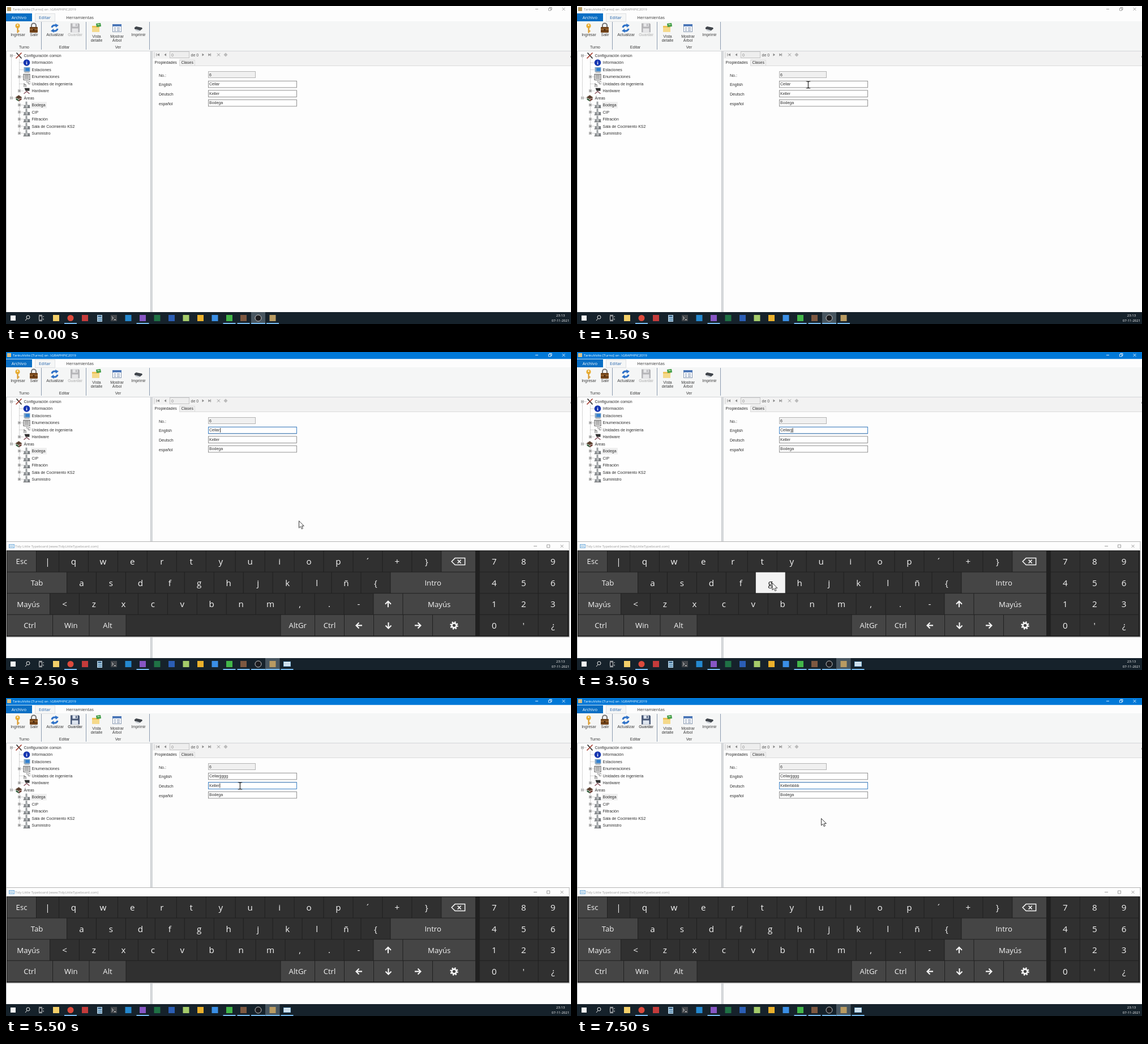
An HTML page for the animation above (8000 ms loop, 998 by 561 pixels).

```html
<!DOCTYPE html>
<html lang="es">
<head>
<meta charset="utf-8">
<title>Áreas</title>
<style>
html, body { margin: 0; width: 100%; height: 100%; overflow: hidden; background: #fdfdfd; }
svg { display: block; width: 998px; height: 561px; font: 7px "Liberation Sans", Arial, sans-serif; }
text { fill: #303030; white-space: pre; }
.ui { font-family: "Open Sans", "Noto Sans", sans-serif; }
.mid { text-anchor: middle; }
.at { animation: 8s step-end infinite; }
@keyframes from2000 { 0% { visibility: hidden } 25%, 100% { visibility: visible } }
@keyframes from2500 { 0% { visibility: hidden } 31.25%, 100% { visibility: visible } }
@keyframes from3000 { 0% { visibility: hidden } 37.5%, 100% { visibility: visible } }
@keyframes from3500 { 0% { visibility: hidden } 43.75%, 100% { visibility: visible } }
@keyframes from4000 { 0% { visibility: hidden } 50%, 100% { visibility: visible } }
@keyframes from4500 { 0% { visibility: hidden } 56.25%, 100% { visibility: visible } }
@keyframes from5500 { 0% { visibility: hidden } 68.75%, 100% { visibility: visible } }
@keyframes from6500 { 0% { visibility: hidden } 81.25%, 100% { visibility: visible } }
@keyframes from7000 { 0% { visibility: hidden } 87.5%, 100% { visibility: visible } }
@keyframes focusTop { 0%, 68.75%, 100% { visibility: hidden } 25% { visibility: visible } }
@keyframes pressJ { 0%, 43.75%, 100% { visibility: hidden } 37.5% { visibility: visible } }
@keyframes pressG { 0%, 62.5%, 100% { visibility: hidden } 43.75% { visibility: visible } }
@keyframes pressB { 0%, 93.75%, 100% { visibility: hidden } 75% { visibility: visible } }
@keyframes caret {
  0% { visibility: hidden }
  25% { visibility: visible; transform: translate(378px, 134px) }
  37.5% { visibility: visible; transform: translate(379.2px, 134px) }
  43.75% { visibility: visible; transform: translate(380.7px, 134px) }
  50% { visibility: visible; transform: translate(384.6px, 134px) }
  56.25% { visibility: visible; transform: translate(392.4px, 134px) }
  68.75% { visibility: visible; transform: translate(377.3px, 150.5px) }
  81.25% { visibility: visible; transform: translate(385px, 150.5px) }
  87.5% { visibility: visible; transform: translate(392.8px, 150.5px) }
  93.75%, 100% { visibility: hidden }
}
@keyframes arrow {
  0% { visibility: hidden }
  31.25% { visibility: visible; transform: translate(517px, 297.5px) }
  37.5% { visibility: visible; transform: translate(447px, 407px) }
  43.75% { visibility: visible; transform: translate(344.5px, 407px) }
  62.5% { visibility: visible; transform: translate(378px, 270px) }
  68.75% { visibility: hidden }
  75% { visibility: visible; transform: translate(366px, 444px) }
  93.75%, 100% { visibility: visible; transform: translate(431px, 212px) }
}
@keyframes beam {
  0%, 31.25%, 75%, 100% { visibility: hidden }
  18.75% { visibility: visible; transform: translate(408.5px, 139px) }
  25% { visibility: visible; transform: translate(407px, 134.5px) }
  68.75% { visibility: visible; transform: translate(413.5px, 155px) }
}
</style>
</head>
<body>
<svg id="stage" viewBox="0 0 998 561"></svg>
<script>
const rect = (x, y, w, h, fill, more = '') =>
  `<rect x="${x}" y="${y}" width="${w}" height="${h}" fill="${fill}" ${more}/>`;
const box = (x, y, w, h, fill, line) =>
  rect(x + .5, y + .5, w - 1, h - 1, fill, `stroke="${line}"`);
const disc = (x, y, r, fill, more = '') => `<circle cx="${x}" cy="${y}" r="${r}" fill="${fill}" ${more}/>`;
const text = (x, y, s, more = '') => `<text x="${x}" y="${y}" ${more}>${s}</text>`;
const ui = (x, y, s, size, fill, cls = '') =>
  text(x, y, s, `class="ui ${cls}" style="font-size:${size}px;fill:${fill}"`);
const fillPath = (d, fill) => `<path d="${d}" fill="${fill}"/>`;
const linePath = (d, stroke, width = 1, more = '') =>
  `<path d="${d}" fill="none" stroke="${stroke}" stroke-width="${width}" ${more}/>`;
const move = (x, y, body) => `<g transform="translate(${x} ${y})">${body}</g>`;
const anim = (name, body) => `<g class="at" style="animation-name:${name}">${body}</g>`;
const typed = (ms, s) => `<tspan class="at" style="animation-name:from${ms}">${s}</tspan>`;

function titleBar(bg, ink, icon) {
  return rect(0, 0, 998, 12.5, bg) + rect(2, 2, 7, 7, icon) +
    ui(12, 8, 'TankuVolto [Turno] on .\\GRAPHPIC2019', 6.1, ink) +
    linePath('M935 5.5h5M958.5 4h4v4h-4zM960 4v-1.5h4v4h-1.5M982.5 3l5 5m0-5l-5 5', ink, .8);
}

const floppy = (main, label) => move(122, 38.5,
  fillPath('M-8-8H6.500L8-6.500V8H-8z', main) + rect(-4.5, -8, 9, 6, label) +
  rect(-5.5, 1, 11, 7, label) + rect(1, -7, 2, 4, main));

function ribbon() {
  const label = (x, y, s, fill = '#3c3c3c') => text(x, y, s, `class="mid" style="fill:${fill}"`);
  const icons =
    move(20.5, 39, disc(0, -4, 4, '#e9ae33') + disc(0, -5.3, 1.2, '#fff') +
      fillPath('M-1-1H1.200V8L0 9L-1 8z', '#d9982a') + rect(1, 4, 2, 2.4, '#d9982a')) +
    move(49, 39, linePath('M-4-1V-5a4 3.500 0 0 1 8 0V-1', '#777', 2) +
      rect(-7, -2, 14, 10, '#704218', 'rx="1"') + rect(-7, 1, 14, 2, '#9a6631') + disc(0, 3, 1.3, '#2a1708')) +
    move(86, 39, linePath('M-5-1a5 5 0 0 1 8-3M5 1a5 5 0 0 1-8 3', '#2f72c8', 3) +
      fillPath('M1-8l6 3l-5 4zM-1 8l-6-3l5-4z', '#2f72c8')) +
    floppy('#b5b5b8', '#e6e6e8') +
    move(160, 39, rect(-8, -4, 13, 10.5, '#edc35a') + rect(-8, -1, 13, 7.5, '#f5d98a') +
      fillPath('M-1-8L7-9L8-3L0-2z', '#3f9c45') + rect(1.5, -7, 4, 1.5, '#bfe3b4')) +
    move(196, 39, box(-8, -7, 16, 14, '#fafcff', '#8a9bb2') + rect(-8, -7, 16, 4, '#4d78b8') +
      linePath('M-5-.5h3M0-.5h5M-5 2h3M0 2h5M-5 4.500h3M0 4.500h5', '#7d8ea8')) +
    move(234, 39, fillPath('M-2-5L6-3.500L3 0L-5-2z', '#fff') + fillPath('M-7-1L-4-3L6-1L7 1L2 5L-7 1.500z', '#41464c') +
      fillPath('M-4 2L3 4L0 6L-6 4z', '#c9ced4'));
  return rect(0, 12.5, 998, 15, '#fdfdfd') + rect(0, 27, 998, 52.5, '#f5f6f6') +
    rect(0, 13, 46, 14, '#0a6fc4') + ui(22.8, 23, 'Archivo', 7.6, '#fff', 'mid') +
    box(51, 13, 36, 15, '#f5f6f6', '#dfe1e3') + ui(68.5, 23, 'Editar', 7.6, '#2464ac', 'mid') +
    ui(130.5, 23, 'Herramientas', 7.6, '#333', 'mid') +
    [62, 141, 253].map(x => rect(x, 28, 1, 49, '#8c9bb0')).join('') + rect(0, 79, 998, 1, '#d3d5d8') +
    icons + label(21, 53, 'Ingresar') + label(49.5, 53, 'Salir') + label(86.5, 53, 'Actualizar') +
    label(122, 53, 'Guardar', '#aaa') + label(160, 55.5, 'Vista') + label(160, 63, 'detalle') +
    label(196, 55.5, 'Mostrar') + label(196, 63, 'Árbol') + label(234, 53, 'Imprimir') +
    label(32, 75, 'Turno') + label(103, 75, 'Editar') + label(198, 75, 'Ver') +
    anim('from5500', floppy('#4a5a78', '#dfe6f0') + label(122, 53, 'Guardar'));
}

function tree() {
  const tanks = rect(-2, -6, 3, 6, '#9b9fa2') + rect(-5, 0, 4, 5, '#8d9194') + rect(-1, -1, 3, 6, '#b3b6b8') +
    rect(2, 0, 3.5, 5, '#777c80') + linePath('M-6 5H6', '#66696c');
  const icon = {
    tools: linePath('M-4-5L5 5', '#333', 1.8) + linePath('M5-5L-5 5', '#a33a2c', 1.6),
    info: disc(0, 0, 5.8, '#1535b0') + text(0, 3, 'i', 'class="mid" style="fill:#fff;font:bold 9px \'Liberation Serif\',serif"'),
    screen: rect(-5, -4.5, 11, 8, '#7fa3c4') + rect(-2, -3, 7, 5, '#2f7fd0') + rect(-4, 4, 9, 1, '#777'),
    list: box(-6, -5, 12, 11, '#fff', '#555') + linePath('M-4-2.500H4M-4 0H4M-4 2.500H4', '#444'),
    unit: text(-5.5, 6, 'h', 'style="font-size:9px"') + text(-1, 1, '°C', 'style="font-size:7px"'),
    device: fillPath('M-4-5H5V0H-2z', '#333') + linePath('M-5 5L0 1L5 5', '#8a5560', 1.6),
    house: fillPath('M-6-1L0-5L6-1L0 2z', '#5b4030') + fillPath('M-5 0L0 3V6L-5 3z', '#35603f') +
      fillPath('M0 3L5 0V3L0 6z', '#6b3a30'),
    tanks
  };
  const nodes = [
    ['Configuración común', 'tools', '-'], ['Información', 'info'], ['Estaciones', 'screen'],
    ['Enumeraciones', 'list', '+'], ['Unidades de ingeniería', 'unit'], ['Hardware', 'device', '+'],
    ['Áreas', 'house', '-'],
    ...['Bodega', 'CIP', 'Filtración', 'Sala de Cocimiento KS2', 'Suministro'].map(s => [s, 'tanks', '+'])
  ];
  const dots = 'stroke-dasharray="1 1"';
  const rows = nodes.map(([name, kind, sign], i) => {
    const y = 87.5 + i * 12.45, root = sign === '-', x = root ? 22.5 : 36.5, bx = x - 13;
    return linePath(`M${bx} ${y}H${x - 6}`, '#999', .8, dots) + move(x, y, icon[kind]) +
      (sign ? box(bx - 2.5, y - 2.5, 5, 5, '#fff', '#b4b4b4') +
        linePath(`M${bx - 1.5} ${y}h3` + (root ? '' : `m-1.500-1.500v3`), '#555', .8) : '') +
      text(root ? 31.5 : 45.5, y + 2.5, name);
  });
  return rect(0, 80, 255.5, 460, '#fefefe') + rect(0, 80, 1, 460, '#b5b8bd') + rect(255.5, 80, 1, 460, '#8f959c') +
    rect(256.5, 80, 1.5, 460, '#dfe1e3') + rect(258, 80, .6, 460, '#b5b8bd') + rect(44.5, 169, 27.5, 11.5, '#efefef') +
    linePath('M9.500 90V162M23.500 94V150M23.500 168V224', '#999', .8, dots) + rows.join('');
}

function form() {
  const outline = (y, fill, line) => rect(357.5, y, 156, 11.6, fill, `stroke="${line}" stroke-width=".8"`);
  const field = (y, s) => outline(y, '#fff', '#777') + text(359, y + 8, s);
  const focus = y => outline(y, 'none', '#2a7fd4');
  return rect(259, 80, 739, 25, '#f2f2f2') + rect(259, 105, 739, 1, '#dcdcdc') +
    linePath('M262 82v9', '#aaa', 1, 'stroke-dasharray="1 1"') +
    linePath('M266 83.500v5M361.500 83.500v5', '#888') +
    fillPath('M271 83.500v5l-4-2.500zM283 83.500v5l-3.500-2.500zM346.500 83.500v5l3.500-2.500zM357.500 83.500v5l3.500-2.500z', '#888') +
    box(289, 80, 35, 12, '#eee', '#c4c4c4') + text(292, 88.5, '0', 'style="fill:#888"') +
    text(326.5, 88.5, 'de 0', 'style="fill:#555"') +
    linePath('M373 83.500l5 5m0-5l-5 5', '#999') + fillPath('M388 82.500l3.500 3.500l-3.500 3.500l-3.500-3.500z', '#bbb') +
    rect(997, 88, 1, 3, '#999') +
    box(306, 95, 28, 11, '#f0f0f0', '#dcdcdc') + rect(259, 93, 47, 13, '#fdfdfd') +
    text(262.5, 101.5, 'Propiedades') + text(309.5, 102.2, 'Clases') +
    ['No.:', 'English', 'Deutsch', 'español'].map((s, i) => text(270, 124.7 + i * 16.6, s)).join('') +
    box(357, 115, 84, 12, '#f0f0f0', '#b4b4b4') + text(359, 123.5, '6') +
    field(132.3, 'Cellar' + typed(3000, 'j') + typed(3500, 'j') + typed(4000, 'g') + typed(4500, 'gg')) +
    field(148.8, 'Keller' + typed(6500, 'bb') + typed(7000, 'bb')) + field(165.3, 'Bodega') +
    anim('focusTop', focus(132.3)) + anim('from5500', focus(148.8)) + anim('caret', rect(0, 0, .8, 8, '#111'));
}

function taskbar() {
  const bar = '#16222b', active = '#485660';
  const square = (x, fill) => rect(x - 5.5, 545, 11, 11, fill);
  const under = (x, w = 22) => rect(x - w / 2, 559, w, 2, '#76b9ed');
  const obs = disc(445.5, 550.5, 5.5, '#1d1d20', 'stroke="#ccc" stroke-width="1"');
  const tool = square(471, '#b99b62');
  const marks = [[88.5, '#f3cf69'], [139.5, '#c43b3b'], [216, '#2489d0'], [241.5, '#8756c4'], [267, '#1f7245'],
    [292.5, '#2b5eb5'], [318, '#a5cc6a'], [343.5, '#eab12c'], [369, '#3a8fe6'], [394.5, '#43b649'], [419.5, '#7d5840']];
  return rect(0, 540, 998, 21, bar) + rect(433, 540, 25, 21, active) +
    rect(8, 546, 9, 9, '#f4f4f4') + disc(39, 549, 3, 'none', 'stroke="#eee"') + linePath('M37 551.500l-3 3.500', '#eee') +
    linePath('M58.500 547v7h5v-7zM66 547v2M66 551v3M58 545.500h6M58 555.500h6', '#ddd', .9) +
    marks.map(m => square(...m)).join('') + disc(114, 550.5, 5.5, '#dc4a3c') +
    rect(161, 545, 9, 12, '#a9c8dd') + rect(162.5, 546.5, 6, 2, '#1f4f78') +
    linePath('M163 551.500h6M163 554.500h6', '#2d6a98', 1.5, 'stroke-dasharray="1.5 .8"') +
    square(190.5, '#44484c') + linePath('M187 548l2.500 2.500l-2.500 2.500M191 553.500h3', '#eee') +
    [114, 241.5, 394.5, 419.5, 471].map(x => under(x)).join('') + under(445.5, 25) + obs + tool +
    anim('from2000', rect(433, 540, 25, 19, bar) + rect(458, 540, 25.5, 21, active) + obs + tool + under(471, 25)) +
    anim('from2500', box(490, 546, 13, 9, '#e8f1f8', '#7fb3d8') +
      linePath('M492 549.500h9M492 552h9', '#5a8fb8', 1, 'stroke-dasharray="1 1"') + under(496.5)) +
    ui(979.5, 548, '23:13', 6, '#fff', 'mid') + ui(979.5, 557.3, '07-11-2021', 6, '#fff', 'mid');
}

const STEP = 51.95, ROW = 37.6;
const turn = { '←': 0, '↑': 90, '→': 180, '↓': 270 };

function glyph(s, x, y, ink) {
  if (s in turn) return move(x, y, linePath('M5.500 0H-5M0-5L-5 0L0 5', ink, 2.1, `transform="rotate(${turn[s]})"`));
  if (s === '⌫') return move(x, y, linePath('M-12 0L-6-6H11.500V6H-6zM-1.500-3l6 6m0-6l-6 6', ink, 1.5));
  if (s === '⚙') return move(x, y, disc(0, 0, 4, 'none', `stroke="${ink}" stroke-width="2.6"`) +
    disc(0, 0, 6, 'none', `stroke="${ink}" stroke-width="2.5" stroke-dasharray="2.36"`));
  const word = s.length > 1;
  return ui(x, y + (word ? 4.8 : 5.6), s.replace('<', '&lt;'), word ? 13.2 : 15.2, ink, 'mid');
}

function key(s, x, row, w, bg, ink = '#f4f4f4') {
  const y = 351 + row * ROW;
  return rect(x, y, w - 1, ROW - 1, bg) + glyph(s, x + w / 2 - .5, y + 18.6, ink);
}

// A token is "label:width"; a bare token is a run of standard keys.
function keyRow(spec, row, x) {
  const keys = spec.split(' ').flatMap(t => t.includes(':') ? [t.split(':')] : [...t].map(c => [c, STEP]));
  return keys.map(([s, w]) => {
    const light = s.length > 1 || (s && '⌫↑↓←→⚙'.includes(s));
    const out = key(s, x, row, +w, light ? '#454545' : '#303030');
    x += +w;
    return out;
  }).join('');
}

function keyboard() {
  const rows = [
    'Esc:52 |:40 qwertyuiop´+} ⌫:60.6',
    'Tab:106 asdfghjklñ{ Intro:150.5',
    'Mayús:76 <zxcvbnm,.- ↑:52 Mayús:128.5',
    'Ctrl:81 Win:64.5 Alt:65 :273 AltGr:60.5 Ctrl:52 ←:52 ↓:52 →:52 ⚙:76'
  ];
  const press = (name, s, n, row, x0) => anim(name, key(s, x0 + n * STEP, row, STEP + 1, '#f3f3f3', '#111'));
  return rect(0, 334, 995.5, 169.5, '#b4b4b4') + rect(1, 335, 993.5, 16, '#fdfdfd') + rect(1, 350, 993.5, 152, '#202020') +
    box(5, 339, 10, 7, '#dcecf8', '#77aeda') + linePath('M7 342.500h6', '#5a8fb8', 1, 'stroke-dasharray="1 1"') +
    ui(16, 345, 'Tidy Little Typeboard (www.TidyLittleTypeboard.com)', 6, '#999') +
    linePath('M932 342.500h6M955.500 340h5v5h-5zM979.500 340l5 5m0-5l-5 5', '#888', .8) +
    rows.map((r, i) => keyRow(r, i, 2)).join('') +
    ['789', '456', '123', "0'¿"].map((r, i) => keyRow(r, i, 836.8)).join('') +
    press('pressJ', 'j', 6, 1, 108) + press('pressG', 'g', 4, 1, 108) + press('pressB', 'b', 5, 2, 78);
}

const pointer =
  anim('arrow', '<path d="M.5.5V12.800L3.400 10.200L5.300 14.600L7.400 13.600L5.500 9.400H9.300z" fill="#fff" stroke="#222" stroke-width=".9"/>') +
  anim('beam', linePath('M-3.500-6H-1L0-5L1-6H3.500M0-5V5M-3.500 6H-1L0 5L1 6H3.500', '#111', 1.2));

document.getElementById('stage').innerHTML =
  rect(0, 0, 998, 561, '#fdfdfd') + titleBar('#fdfdfd', '#8c8c8c', '#b99b62') +
  anim('from2000', titleBar('#0078d7', '#fff', '#d8bd84')) +
  ribbon() + tree() + form() + taskbar() + anim('from2500', keyboard()) + pointer;
</script>
</body>
</html>
```
